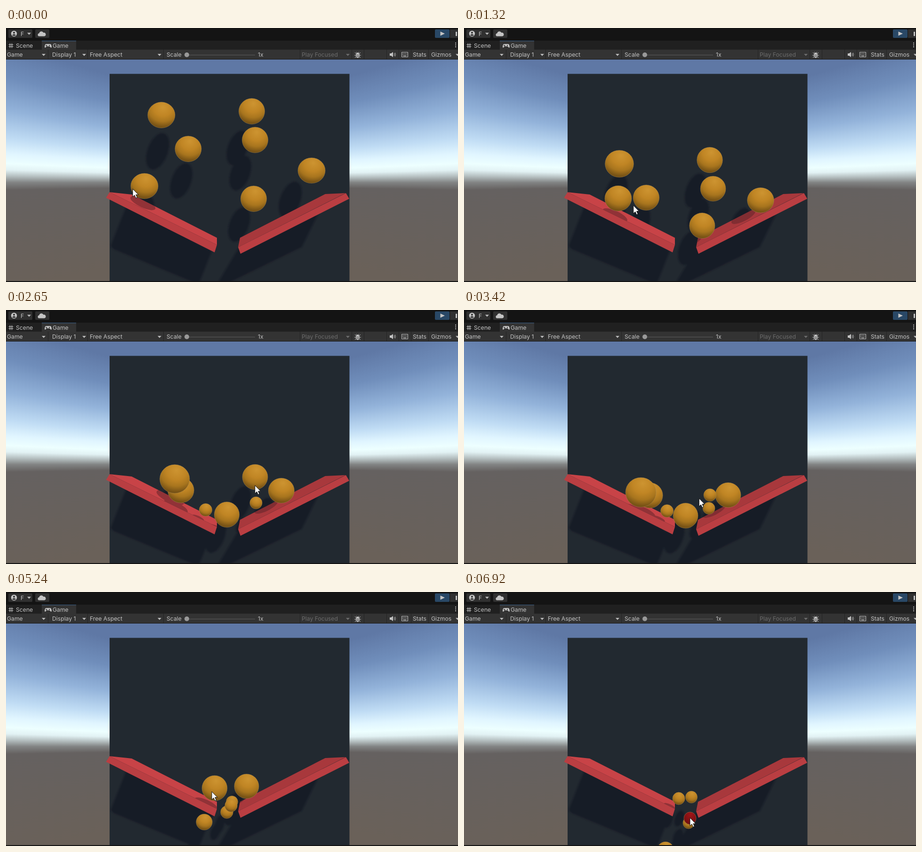
Recreate the animation shown at these times as an HTML page. Size 960 by 540 pixels, loop 6990 ms.

```html
<!DOCTYPE html>
<html lang="en">
<head>
<meta charset="utf-8">
<title>Falling balls</title>
<style>
html, body { margin: 0; width: 100%; height: 100%; overflow: hidden; background: #141414; }
svg { display: block; width: 960px; height: 540px; }
text { font: 12.2px Inter, Roboto, sans-serif; fill: #c4c4c4; }
</style>
</head>
<body>
<svg viewBox="0 0 960 540">
  <defs>
    <linearGradient id="skyTone" gradientUnits="userSpaceOnUse" x1="0" y1="67" x2="0" y2="538">
      <stop offset="0" stop-color="#5f78a5"/>
      <stop offset=".14" stop-color="#708ebb"/>
      <stop offset=".27" stop-color="#93b3da"/>
      <stop offset=".38" stop-color="#c0dcf4"/>
      <stop offset=".44" stop-color="#e0f5ff"/>
      <stop offset=".48" stop-color="#edffff"/>
      <stop offset=".505" stop-color="#e2f2f4"/>
      <stop offset=".53" stop-color="#b4bebf"/>
      <stop offset=".555" stop-color="#828484"/>
      <stop offset=".585" stop-color="#656160"/>
      <stop offset="1" stop-color="#6a6159"/>
    </linearGradient>
    <radialGradient id="gold" cx=".56" cy=".2" r=".85">
      <stop offset="0" stop-color="#cd9431"/>
      <stop offset=".4" stop-color="#c08524"/>
      <stop offset=".65" stop-color="#a8751e"/>
      <stop offset=".85" stop-color="#7f5817"/>
      <stop offset="1" stop-color="#674712"/>
    </radialGradient>
    <radialGradient id="red" cx=".56" cy=".2" r=".85">
      <stop offset="0" stop-color="#a01518"/>
      <stop offset="1" stop-color="#6c0d10"/>
    </radialGradient>
    <clipPath id="wall"><path d="M220 97H729.5V538H220z"/></clipPath>
    <clipPath id="tops"><path d="M220 349L267 354 448 446V461zM678 353L721 351 493 466 497 446z"/></clipPath>
    <clipPath id="view"><path d="M0 67H960V538H0z"/></clipPath>
    <filter id="soft" filterUnits="userSpaceOnUse" x="200" y="90" width="550" height="460">
      <feGaussianBlur stdDeviation="1.6"/>
    </filter>
  </defs>

  <g id="sky" fill="url(#skyTone)" clip-path="url(#view)"></g>
  <path fill="#222930" d="M220 97.400H729.5V538H220z"/>
  <g clip-path="url(#wall)">
    <g id="shadows" fill="#171d28" filter="url(#soft)">
      <path d="M256 378L222 464 228 470 409 545 437 474zM494 468L448 545H466L628 466 668 385z"/>
    </g>
  </g>
  <path fill="#c84347" d="M220 349L267 354 448 446V461z"/>
  <path fill="#b93e42" d="M220 349L448 461 443 477 212.500 361z"/>
  <path fill="#a8383c" d="M678 353L721 351 493 466 497 446z"/>
  <path fill="#ba3e42" d="M722 351L729 363 498 480 493 466z"/>
  <g id="contacts" fill="#5a2329" opacity=".5" clip-path="url(#tops)"></g>
  <g id="bodies" clip-path="url(#view)"></g>

  <path fill="#141414" d="M0 0H960V27H0zM0 538H960V540H0z"/>
  <path fill="#202020" d="M0 27H960V46H0z"/>
  <path fill="#333" d="M76 27H149V46H76zM0 46H960V66H0z"/>
  <path fill="#3a6089" d="M76 27H149V28H76z"/>
  <path fill="#191919" d="M0 66H960V67H0z"/>
  <g fill="#303030">
    <rect x="5" y="3" width="51" height="18" rx="2"/>
    <rect x="62" y="3" width="30" height="18" rx="2"/>
    <rect x="943" y="3" width="20" height="18"/>
  </g>
  <rect x="911" y="3" width="31" height="18" rx="2" fill="#294866"/>
  <path stroke="#242424" d="M89.500 46v20M173.500 46v20M334.500 46v20M624.500 46v20M734.500 46v20M760.500 46v20M808.500 46v20M834.500 46v20M860.500 46v20M897.500 46v20"/>
  <g fill="#c4c4c4">
    <circle cx="17" cy="12" r="6.2"/>
    <path d="M70 17.500a3.200 3.200 0 0 1 .5-6.300 4.800 4.800 0 0 1 9-1.300 3.800 3.800 0 0 1 2 7.600z"/>
    <path d="M922.500 7.500L932 12 922.500 16.500zM955 8h3v9h-3z"/>
    <path d="M85 34h9q3 1 3 7-2 2-4-2h-7q-2 4-4 2 0-6 3-7z"/>
    <path d="M954 31h2v2h-2zM954 35h2v2h-2zM954 39h2v2h-2z"/>
    <circle cx="384" cy="57" r="5" fill="#999"/>
    <path d="M815 54h3l4-3v11l-4-3h-3z"/>
    <ellipse cx="747" cy="58" rx="4" ry="5.500"/>
  </g>
  <g fill="none" stroke="#c4c4c4">
    <path d="M8.500 32.500v10M12.500 32.500v10M5.500 35.500h10M5.500 39.500h10" stroke-width="1.2"/>
    <path d="M824 54q2 2.500 0 5M826 52.500q3 4 0 8"/>
    <path d="M741 52l3 3M753 52l-3 3M740 58h14M741 63l3-2M753 63l-3-2M744 51l2 2M750 51l-2 2"/>
    <path d="M840.500 51.500h13v10h-13z"/>
    <path d="M842 54.500h10M842 57.500h10" stroke-dasharray="2 1"/>
    <path d="M844 59.500h6"/>
    <path d="M389 57.500H529" stroke="#5c5c5c"/>
  </g>
  <g fill="#303030">
    <circle cx="17" cy="10" r="2"/>
    <path d="M13 15.500q4-5 8 0-4 2.500-8 0z"/>
    <path d="M84 37h4v1h-4zM85.500 35.500h1v4h-1zM91 36h2v2h-2z"/>
    <path d="M744 57h6v1h-6zM744 60h6v1h-6z"/>
  </g>
  <path fill="#b8b8b8" d="M45 10h8l-4 4.500zM76 55h8l-4 4.500zM162 55h8l-4 4.500zM322 55h8l-4 4.500zM955 55h8l-4 4.500z"/>
  <path fill="#6c6c6c" d="M722 55h8l-4 4.500z"/>
  <text x="31" y="16.500">F</text>
  <text x="21" y="42">Scene</text>
  <text x="99" y="42">Game</text>
  <text x="2" y="61">Game</text>
  <text x="98" y="61">Display 1</text>
  <text x="178" y="61">Free Aspect</text>
  <text x="341" y="61">Scale</text>
  <text x="535" y="61">1x</text>
  <text x="628" y="61" style="fill:#6c6c6c">Play Focused</text>
  <text x="864" y="61">Stats</text>
  <text x="903" y="61">Gizmos</text>
  <path id="cursor" fill="#fff" stroke="#111" d="M0 0V17L4 13.400 6.700 19.500 9.500 18.300 6.800 12.300H12z"/>
</svg>

<script>
const LOOP = 6.99; // seconds
const $ = id => document.getElementById(id);
const mix = (a, b, p) => a + (b - a) * p;
const mixPoint = (a, b, p) => ({ x: mix(a.x, b.x, p), y: mix(a.y, b.y, p) });

function set(el, attrs) {
  for (const key in attrs) el.setAttribute(key, attrs[key]);
  return el;
}
function add(parent, tag, attrs) {
  const el = document.createElementNS('http://www.w3.org/2000/svg', tag);
  return $(parent).appendChild(set(el, attrs));
}

// Wide-angle sky: columns stretch away from the horizon toward the sides.
const HORIZON = 328, FOCAL = 407;
for (let x = 0; x < 960; x += 8) {
  const stretch = Math.hypot(1, (x - 476) / FOCAL) / 1.35;
  add('sky', 'rect', {
    x, y: -200, width: 8, height: 1100,
    transform: `matrix(1 0 0 ${stretch} 0 ${HORIZON * (1 - stretch)})`
  });
}

const at = (t, x, y) => ({ t, x, y });
const fall = t => 56 * t + 17 * t * t;
const settle = p => p * (1.2 - .2 * p);

// A ball falls until "land", then rolls to each stop. A first press ("tap")
// halves it; a second press ("pop") turns it red and removes it.
function ball(x, y, r, rEnd, land, tap, stops, pop = Infinity) {
  const landing = at(land, x, y + fall(land));
  return { x, y, r, rEnd, land, tap, pop, path: [landing, ...stops] };
}
const b = ball(387, 257, 28, 26, 1.5, 1.6,
  [at(1.81, 390, 410), at(2.65, 424, 425), at(4.2, 437, 429), at(5.24, 469, 468), at(6.3, 466, 500)], 6.2);
const e = ball(529, 238, 27.5, 24, 1.75, 2.4,
  [at(2.65, 531, 410), at(4.2, 511, 431), at(5.24, 480, 446), at(6.92, 477, 491)]);
const c = ball(294, 336, 29, 26, 0, 5.4,
  [at(.83, 310, 354), at(5.24, 443, 417), at(6.5, 456, 439)]);
const f = ball(649, 303, 29, 25, .8, 5.8,
  [at(5.24, 511, 413), at(6.3, 483, 436)]);
const g = ball(526, 363, 27.5, 25, .72, 4.06,
  [at(2.65, 469, 435), at(4.2, 472, 439)], 4.26);
const d = ball(522, 177, 27.5, 26, 1.8, 2.75,
  [at(2.65, 529, 355), at(4.2, 517, 425), at(5.24, 478, 454), at(6.92, 480, 481)], 6.85);
const a = ball(330, 185, 29, 36, 1.55, 4.55,
  [at(4.2, 391, 413), at(5.24, 421, 489), at(6.92, 428, 549)]);
const balls = [b, e, c, f, g, d, a]; // back to front

function follow(path, t, ease) {
  const i = path.findIndex(stop => stop.t > t);
  if (i < 0) return path[path.length - 1];
  const from = path[i - 1], to = path[i];
  return mixPoint(from, to, ease((t - from.t) / (to.t - from.t)));
}
const place = (one, t) => t < one.land
  ? { x: one.x, y: one.y + fall(t) }
  : follow(one.path, t, settle);

// The pointer visits every ball when it is pressed.
const visit = (one, t) => ({ t, ...place(one, t) });
const route = [at(0, 269, 342), visit(c, .83),
  ...balls.flatMap(one => [one.tap, one.pop].filter(isFinite).map(t => visit(one, t)))
].sort((p, q) => p.t - q.t);

for (const one of balls) {
  one.shadow = add('shadows', 'ellipse', {});
  one.contact = add('contacts', 'ellipse', {});
  one.body = add('bodies', 'ellipse', { stroke: '#b08d52', 'stroke-opacity': .6, 'stroke-width': .8 });
}

function drawBall(one, t) {
  const { x, y } = place(one, t);
  const r = mix(one.r, one.rEnd, t / LOOP) * (t < one.tap ? 1 : .5);
  const visibility = t < one.pop + .1 ? 'visible' : 'hidden';
  set(one.body, {
    cx: x, cy: y, rx: r, ry: r * (1.02 - .0005 * Math.abs(x - 475)), visibility,
    fill: t < one.pop ? 'url(#gold)' : 'url(#red)'
  });
  // Light comes from the upper right, more slanted toward the right side.
  const dx = -8 - (x - 330) * .117;
  const dy = 77 - (y - 185) * .125;
  set(one.shadow, {
    rx: r * .74, ry: r * 1.4, visibility,
    transform: `translate(${x + dx} ${y + dy}) rotate(20)`
  });
  set(one.contact, {
    rx: r, ry: r * .32, visibility,
    transform: `translate(${x + dx * .85} ${y + r * 1.25}) rotate(${x < 470 ? 25 : -27})`
  });
}

function draw(t) {
  for (const one of balls) drawBall(one, t);
  const { x, y } = follow(route, t, p => p);
  $('cursor').setAttribute('transform', `translate(${x} ${y})`);
}

const start = performance.now();
function tick() {
  draw((performance.now() - start) / 1000 % LOOP);
  requestAnimationFrame(tick);
}
tick();
</script>
</body>
</html>
```
